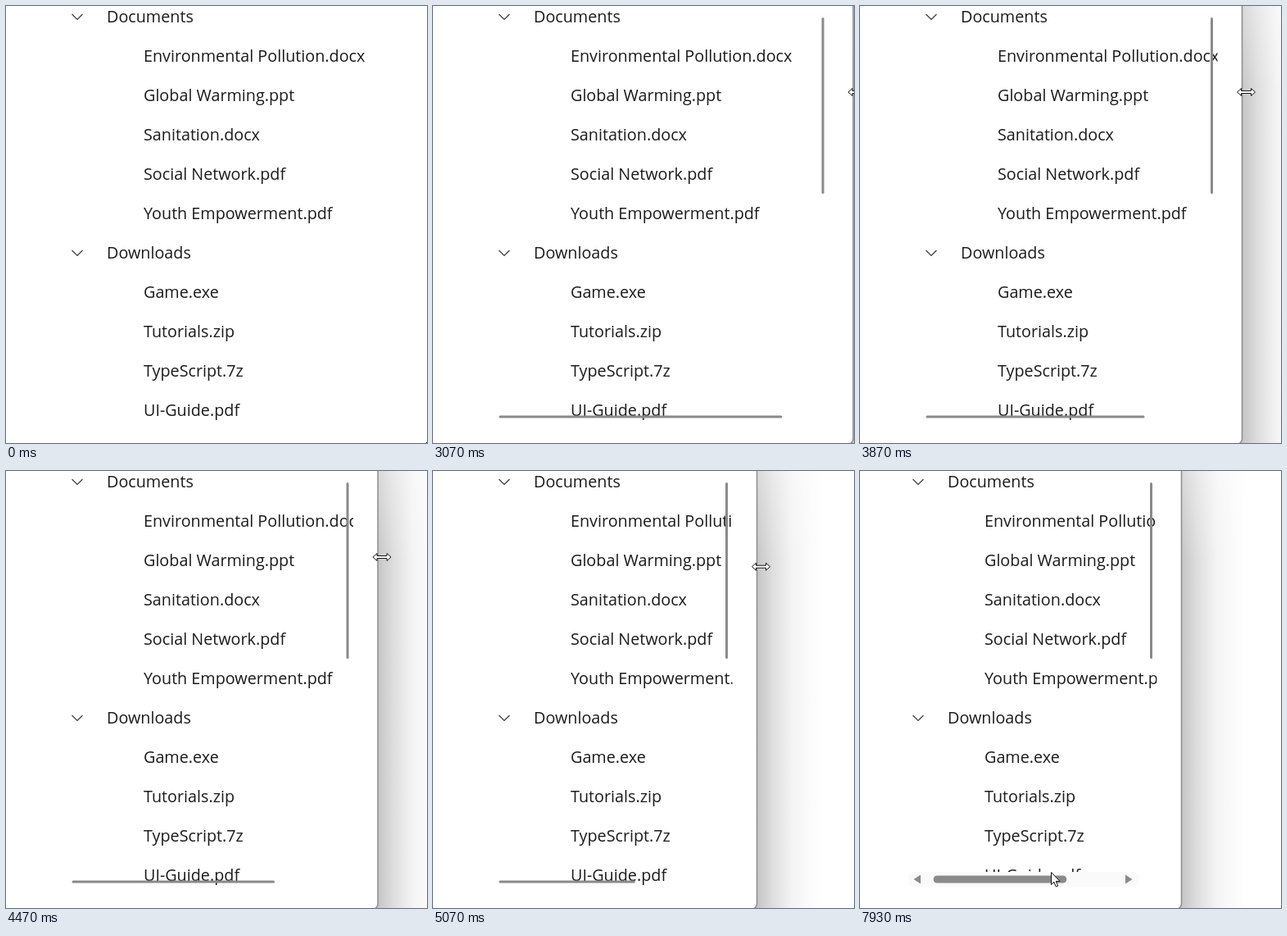
Recreate the animation shown at these times as an HTML page. Size 514 by 533 pixels, loop 8 s.

```html
<!DOCTYPE html>
<html lang="en">
<head>
<meta charset="utf-8">
<title>Resizable tree view</title>
<style>
  html, body { margin: 0; width: 100%; height: 100%; overflow: hidden; background: #fff; }
  svg { display: block; width: 514px; height: 533px; }
  text { font: 19.75px "Open Sans", "Noto Sans", sans-serif; fill: #1b1b1b; white-space: pre; }
  .bar { fill: #8a8a8a; }
  .chevron { fill: none; stroke: #3a3a3a; stroke-width: 1.2; }
  .cursor { fill: #fff; stroke: #111; stroke-width: 1; }
</style>
</head>
<body>
<svg viewBox="0 0 514 533">
  <defs>
    <linearGradient id="shade" gradientUnits="userSpaceOnUse" x1="0" y1="0" x2="78" y2="0">
      <stop offset="0" stop-color="#c5c5c5"/>
      <stop offset=".25" stop-color="#dedede"/>
      <stop offset=".55" stop-color="#f4f4f4"/>
      <stop offset="1" stop-color="#fff"/>
    </linearGradient>
    <linearGradient id="fade" x1="0" y1="0" x2="0" y2="1">
      <stop offset="0" stop-color="#fff" stop-opacity=".35"/>
      <stop offset="1" stop-color="#fff" stop-opacity="0"/>
    </linearGradient>
    <clipPath id="view"><rect id="viewBox" height="506"/></clipPath>
  </defs>

  <g id="shadow">
    <rect x="-12" width="540" height="533" fill="url(#shade)"/>
    <rect x="-12" width="540" height="110" fill="url(#fade)"/>
  </g>
  <rect id="pane" x="-40" y="-40" height="574.5" rx="7" fill="#fff" stroke="#8c8c8c" stroke-width="1.5"/>

  <g clip-path="url(#view)">
    <rect id="hover" width="520" height="42" rx="5" fill="#f4f4f4"/>
    <g id="tree"></g>
  </g>

  <g id="bars">
    <rect id="vbar" class="bar" y="14" width="3" height="215" rx="1.5"/>
    <rect id="groove" x="59" y="489" width="281" height="18" rx="6" fill="#fafafa"/>
    <g id="arrows" class="bar">
      <path d="M65.5 498L74 492.5V503.5Z"/>
      <path d="M332.5 498L324 492.5V503.5Z"/>
    </g>
    <rect id="hbar" class="bar"/>
  </g>

  <rect id="dot" x="513" y="532" width="1" height="1" fill="#222"/>
  <path id="sizer" class="cursor" d="M-11 0L-6 -4.5V-1.5H6V-4.5L11 0L6 4.5V1.5H-6V4.5Z"/>
  <path id="arrow" class="cursor" d="M.5 .5V15.5L3.9 12.3L6.3 18L8.7 17L6.3 11.4H11Z"/>
</svg>

<script>
const LOOP = 8000, STEP = 1000 / 15, ROW = 48;
const $ = id => document.getElementById(id);
const set = (id, attrs) => {
  for (const name in attrs) $(id).setAttribute(name, attrs[name]);
};
const show = (id, on) => set(id, { opacity: +on });
const move = (id, x, y = 0) => set(id, { transform: `translate(${x} ${y})` });

const rows = [
  'Documents', '-Environmental Pollution.docx', '-Global Warming.ppt',
  '-Sanitation.docx', '-Social Network.pdf', '-Youth Empowerment.pdf',
  'Downloads', '-Game.exe', '-Tutorials.zip', '-TypeScript.7z', '-UI-Guide.pdf'
];
const isLeaf = k => rows[k][0] === '-';
const textX = k => isLeaf(k) ? 168 : 123;

function add(tag, attrs, text = '') {
  const el = document.createElementNS('http://www.w3.org/2000/svg', tag);
  for (const name in attrs) el.setAttribute(name, attrs[name]);
  el.textContent = text;
  $('tree').append(el);
}
rows.forEach((row, k) => {
  const y = k * ROW;
  add('text', { x: textX(k), y: y + 20 }, isLeaf(k) ? row.slice(1) : row);
  if (!isLeaf(k)) add('path', { class: 'chevron', d: `M80.5 ${y + 10}l6.5 6.5l6.5 -6.5` });
});

function drawHover(x, y, right, on) {
  const k = Math.floor((y + 8) / ROW), top = k * ROW - 8;
  const hit = on && y < 472 && y - top < 42 && x < right && x > textX(k) - 14;
  show('hover', hit);
  if (hit) set('hover', { x: textX(k) - 14, y: top });
}

function draw(ms) {
  const t = Math.floor((ms + 5) / STEP) * STEP;
  // Progress from 0 to 1 between two times
  const ramp = (from, to) => Math.min(1, Math.max(0, (t - from) / (to - from)));

  // Window edge: three pulls to the left, then a small release
  const pull = ramp(4467, 5133);
  const edge = 517 - 48 * ramp(3000, 3800) - 15 * ramp(3800, 4200)
    - 65 * pull + 3.5 * ramp(5533, 5667);
  const drag = ramp(7800, 7933), scroll = 16 * drag;
  const right = edge - 30;

  move('shadow', edge);
  set('pane', { width: edge + 40 });
  set('viewBox', { width: right });
  move('tree', -scroll);

  // Scroll indicators; the thumb length is track squared over content width
  const grow = ramp(7067, 7333), thick = 3 + 6 * grow;
  show('bars', ramp(867, 1067) - ramp(5533, 5667) + ramp(5933, 6067));
  set('vbar', { x: edge - 38.5 });
  set('hbar', {
    x: 80.5 + scroll * 0.57, y: 501 - 3 * grow - thick / 2,
    width: (edge - 129.6) ** 2 / 425, height: thick, rx: thick / 2
  });
  show('groove', grow);
  show('arrows', grow);

  // Pointer: resize handle on the edge, then an arrow inside the window
  const pointing = t > 5940, arrive = ramp(1733, 2067);
  const glide = 1 - (1 - ramp(5933, 6533)) ** 1.75, nudge = ramp(6600, 6733);
  const x = 406 - 191 * glide - 3 * nudge + 21 * drag;
  const y = 140 + 335 * glide + 14 * nudge;
  move('sizer', edge + 5 + 12 * (1 - arrive), 112 - 7 * arrive + 13 * pull);
  move('arrow', x, y);
  show('sizer', t > 1740 && !pointing);
  show('arrow', pointing);
  show('dot', t < 930);
  drawHover(x, y, right, pointing);
}

const start = performance.now();
function frame() {
  draw((performance.now() - start) % LOOP);
  requestAnimationFrame(frame);
}
frame();
</script>
</body>
</html>
```
